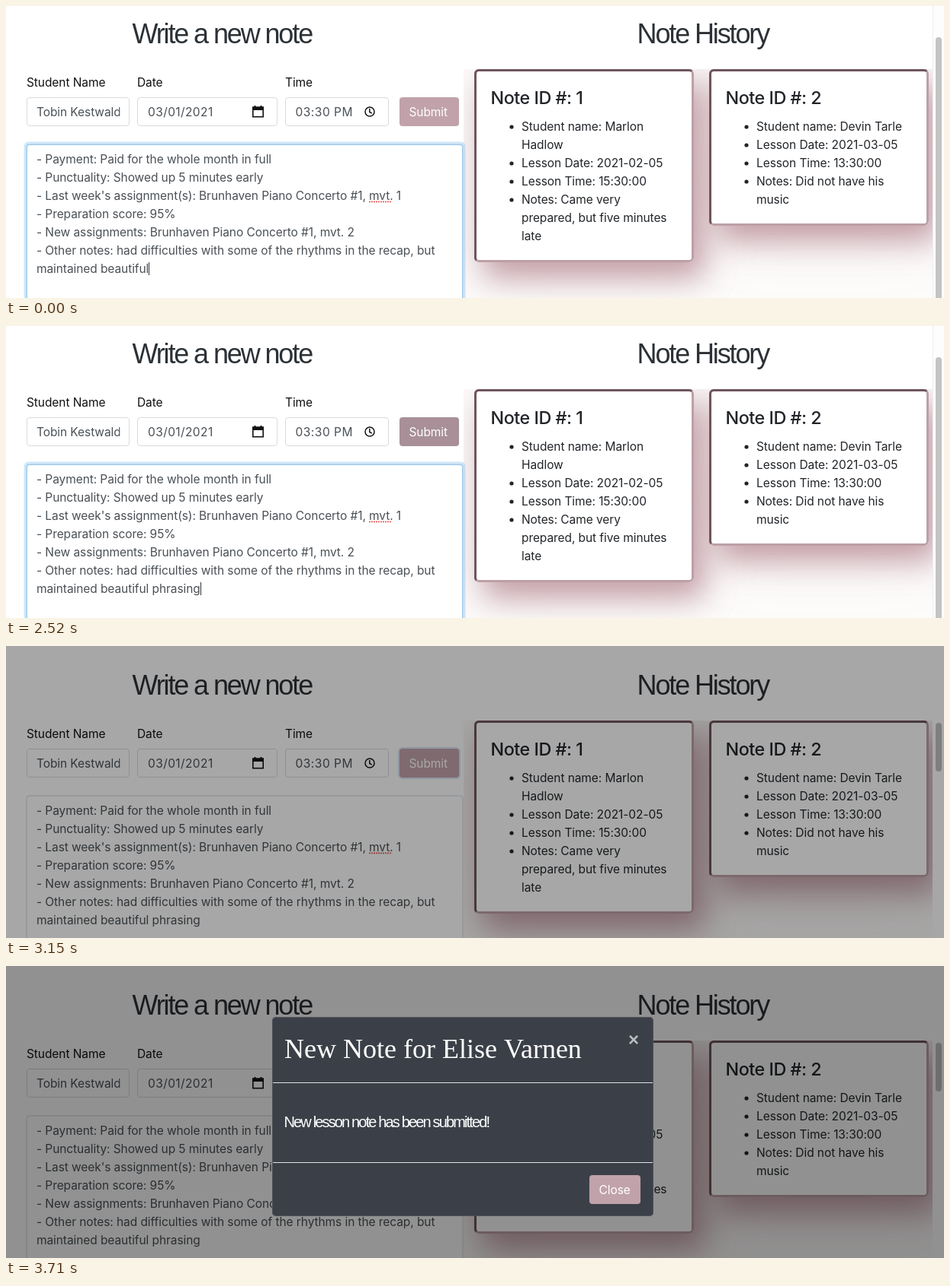
An HTML page with a canvas for the animation above (3780 ms loop, 1230x384 px).

```html
<!DOCTYPE html>
<html lang="en">
<head>
<meta charset="utf-8">
<title>Lesson notes</title>
<style>
  html, body { margin: 0; width: 100%; height: 100%; overflow: hidden; background: #fff; }
  canvas { display: block; }
</style>
</head>
<body>
<canvas id="stage" width="1230" height="384"></canvas>
<script>
const ctx = document.getElementById('stage').getContext('2d');
const LOOP = 3780, STEP = 70;
const BODY = '15.5px Inter, sans-serif', TRACKING = -0.08;
const HEADING = '36px "Liberation Sans", Arial, sans-serif';
const INK = '#4a5056', HEADING_INK = '#2c3136';
const MAUVE = [193, 162, 170], MAUVE_DARK = [140, 122, 131];

const NOTE = [
  '- Payment: Paid for the whole month in full',
  '- Punctuality: Showed up 5 minutes early',
  "- Last week's assignment(s): Brunhaven Piano Concerto #1, mvt. 1",
  '- Preparation score: 95%',
  '- New assignments: Brunhaven Piano Concerto #1, mvt. 2',
  '- Other notes: had difficulties with some of the rhythms in the recap, but'
];
const TYPED = 'maintained beautiful', REST = ' phrasing';
const KEY_TIMES = [140, 280, 420, 560, 700, 980, 1120, 1260, 1330];

// Entries starting with a space continue the bullet above them.
const CARDS = [
  { x: 614, h: 254, id: 1, lines: ['Student name: Marlon', ' Hadlow', 'Lesson Date: 2021-02-05',
    'Lesson Time: 15:30:00', 'Notes: Came very', ' prepared, but five minutes', ' late'] },
  { x: 922, h: 206, id: 2, lines: ['Student name: Devin Tarle', 'Lesson Date: 2021-03-05',
    'Lesson Time: 13:30:00', 'Notes: Did not have his', ' music'] }
];

const clamp = v => Math.max(0, Math.min(1, v));
const ramp = (t, start, length) => clamp((t - start) / length);
const rgb = c => `rgb(${c.map(Math.round).join(',')})`;
const mix = (a, b, k) => a.map((v, i) => v + (b[i] - v) * k);

function easeOut(p) {
  // cubic-bezier(0, 0, .58, 1)
  let lo = 0, hi = 1;
  for (let i = 0; i < 20; i++) {
    const s = (lo + hi) / 2;
    if (1.74 * (1 - s) * s * s + s * s * s < p) lo = s; else hi = s;
  }
  return 3 * lo * lo - 2 * lo * lo * lo;
}

function text(str, x, y, color, font = BODY, spacing = TRACKING) {
  ctx.font = font;
  ctx.letterSpacing = spacing + 'px';
  ctx.fillStyle = color;
  ctx.fillText(str, x, y);
  return ctx.measureText(str).width;
}

function roundRect(x, y, w, h, r) {
  ctx.beginPath();
  ctx.roundRect(x, y, w, h, r);
}

function box(x, y, w, h, r, fill, stroke, weight = 1) {
  if (fill) {
    roundRect(x, y, w, h, r);
    ctx.fillStyle = fill;
    ctx.fill();
  }
  if (stroke) {
    const d = weight / 2;
    roundRect(x + d, y + d, w - weight, h - weight, r - d);
    ctx.strokeStyle = stroke;
    ctx.lineWidth = weight;
    ctx.stroke();
  }
}

function shadow(x, y, w, h, dx, dy, blur, color) {
  ctx.save();
  ctx.shadowOffsetX = dx;
  ctx.shadowOffsetY = dy;
  ctx.shadowBlur = blur;
  ctx.shadowColor = color;
  box(x, y, w, h, 6, '#fff');
  ctx.restore();
}

function drawCard({ x, h, id, lines }) {
  const y = 83, w = 288;
  box(x, y, w, h, 6, '#fff', '#bd9fa7', 3);
  // Inset border: the top and left sides are darker.
  ctx.save();
  ctx.beginPath();
  [[x, y], [x + w, y], [x + w - 8, y + 8], [x + 8, y + 8], [x + 8, y + h - 8], [x, y + h]]
    .forEach(p => ctx.lineTo(...p));
  ctx.clip();
  box(x, y, w, h, 6, null, '#6f555c', 3);
  ctx.restore();

  text('Note ID #: ' + id, x + 21.5, 129, '#212529', '500 23.3px Inter, sans-serif', -0.45);
  lines.forEach((line, i) => {
    const base = 164 + i * 24;
    text(line.trim(), x + 62, base, '#212529');
    if (line[0] === ' ') return;
    ctx.beginPath();
    ctx.arc(x + 49, base - 5, 2.6, 0, Math.PI * 2);
    ctx.fill();
  });
}

function drawHistory() {
  ctx.save();
  ctx.beginPath();
  ctx.rect(600, 83, 615, 320);
  ctx.clip();
  ctx.fillStyle = '#fdfcfb';
  ctx.fillRect(600, 83, 615, 320);
  for (const { x, h } of CARDS) {
    shadow(x, 83, 288, h, 10, 16, 80, 'rgba(190,150,155,.18)');
    shadow(x, 83, 288, h, 12, 20, 38, 'rgba(165,110,124,.62)');
  }
  CARDS.forEach(drawCard);
  ctx.restore();
  text('Note History', 827.5, 49, HEADING_INK, HEADING, -2.12);
}

function drawCalendar() {
  ctx.strokeStyle = ctx.fillStyle = '#111';
  ctx.lineWidth = 1.6;
  ctx.strokeRect(323.8, 133.3, 13.4, 12.4);
  ctx.fillRect(323, 132.5, 15, 4.5);
  ctx.fillRect(325.5, 131, 2, 3);
  ctx.fillRect(333.5, 131, 2, 3);
}

function drawClock() {
  ctx.strokeStyle = '#111';
  ctx.lineWidth = 1.5;
  ctx.beginPath();
  ctx.arc(477, 139, 6, 0, Math.PI * 2);
  ctx.moveTo(476.8, 135);
  ctx.lineTo(476.8, 139.5);
  ctx.lineTo(479.8, 141.2);
  ctx.stroke();
}

function drawSubmit(t) {
  const hover = t < 3150 ? ramp(t, 2450, 150) : 0;
  const glow = ramp(t, 2870, 140);
  if (glow) box(514, 118, 82, 42, 6, `rgba(150,180,225,${0.35 * glow})`);
  box(516, 120, 78, 38, 4, rgb(mix(MAUVE, MAUVE_DARK, hover)));
  text('Submit', 528.5, 145, '#fff');
}

function drawNote(t) {
  const focus = 1 - ramp(t, 2870, 150);
  if (focus) box(23.5, 178.5, 579, 250, 6, `rgba(128,189,236,${0.38 * focus})`);
  box(26.5, 181.5, 573, 246, 4, '#fff', rgb(mix([206, 214, 220], [155, 199, 232], focus)), 1 + 0.5 * focus);

  NOTE.forEach((line, i) => text(line, 40, 207 + i * 24, INK));

  // Spell-check underline
  ctx.font = BODY;
  ctx.letterSpacing = TRACKING + 'px';
  const start = 40 + ctx.measureText(NOTE[2].split('mvt')[0]).width;
  const end = start + ctx.measureText('mvt').width;
  ctx.fillStyle = '#e0524f';
  for (let x = start; x < end; x += 3) ctx.fillRect(x, 256.5, 1.8, 1.8);

  const typed = KEY_TIMES.filter(k => k <= t).length;
  const width = text(TYPED + REST.slice(0, typed), 40, 351, INK);
  if (t < 1820 || (t >= 2310 && t < 2800)) {
    ctx.fillStyle = '#333';
    ctx.fillRect(Math.round(40 + width), 337, 1, 17);
  }
}

function drawForm(t) {
  text('Write a new note', 165.5, 49, HEADING_INK, HEADING, -2.12);
  [['Student Name', 27], ['Date', 172], ['Time', 366]].forEach(([label, x]) => text(label, x, 106, '#111'));
  [[27, 135], [172, 184], [366, 136]].forEach(([x, w]) => box(x, 120, w, 38, 4, '#fff', '#d7dce0'));

  ctx.save();
  ctx.beginPath();
  ctx.rect(39, 121, 110.5, 36);
  ctx.clip();
  text('Tobin Kestwald', 40, 145, INK);
  ctx.restore();

  text('03/01/2021', 186, 145, INK, BODY, 0.4);
  text('03:30 PM', 379.5, 145, INK, BODY, 0.5);
  drawCalendar();
  drawClock();
  drawSubmit(t);
  drawNote(t);
}

function drawScrollbar(opened) {
  if (opened) {
    box(1219, 101, 8, 64, 4, '#c1c1c1');
    return;
  }
  ctx.fillStyle = '#fdfdfd';
  ctx.fillRect(1215, 0, 15, 384);
  ctx.fillStyle = '#eee';
  ctx.fillRect(1215, 0, 1, 384);
  box(1219, 41, 8, 360, 4, '#c4c4c4');
}

function drawModal(t) {
  const alpha = ramp(t, 3205, 140);
  if (!alpha) return;
  const filled = t >= 3290;
  const bodyHeight = filled ? 105 : 59;
  const footer = 86 + bodyHeight;
  ctx.save();
  ctx.globalAlpha = alpha;
  ctx.translate(350, 67 - 50 * (1 - easeOut(ramp(t, 3100, 300))));
  box(-1, 0, 500, footer + 71, 5, '#3b4048', 'rgba(90,92,96,.6)');
  ctx.fillStyle = '#dee2e6';
  ctx.fillRect(0, 86, 498, 1);
  ctx.fillRect(0, footer, 498, 1);
  text('New Note for Elise Varnen', 15, 54, '#fff', '36px "Liberation Serif", Times, serif', 0);
  text('×', 466, 38, '#b9bbbe', 'bold 24px "Liberation Sans", Arial, sans-serif', 0);
  if (filled) {
    text('New lesson note has been submitted!', 14.5, 145, '#fff',
      '20px "Liberation Sans", Arial, sans-serif', -1.85);
  }
  box(415, footer + 17, 67, 38, 4, rgb(MAUVE));
  text('Close', 427.5, footer + 42, '#fff');
  ctx.restore();
}

function draw(t) {
  const opened = t >= 3080;
  ctx.fillStyle = '#fff';
  ctx.fillRect(0, 0, 1230, 384);
  ctx.save();
  if (opened) ctx.translate(0, 15);
  drawHistory();
  drawForm(t);
  ctx.restore();
  drawScrollbar(opened);
  ctx.fillStyle = `rgba(0,0,0,${0.43 * ramp(t, 3030, 150)})`;
  ctx.fillRect(0, 0, 1230, 384);
  drawModal(t);
}

const origin = performance.now();
function tick() {
  const t = (performance.now() - origin) % LOOP;
  draw(Math.floor(t / STEP) * STEP);
  requestAnimationFrame(tick);
}
tick();
</script>
</body>
</html>
```
